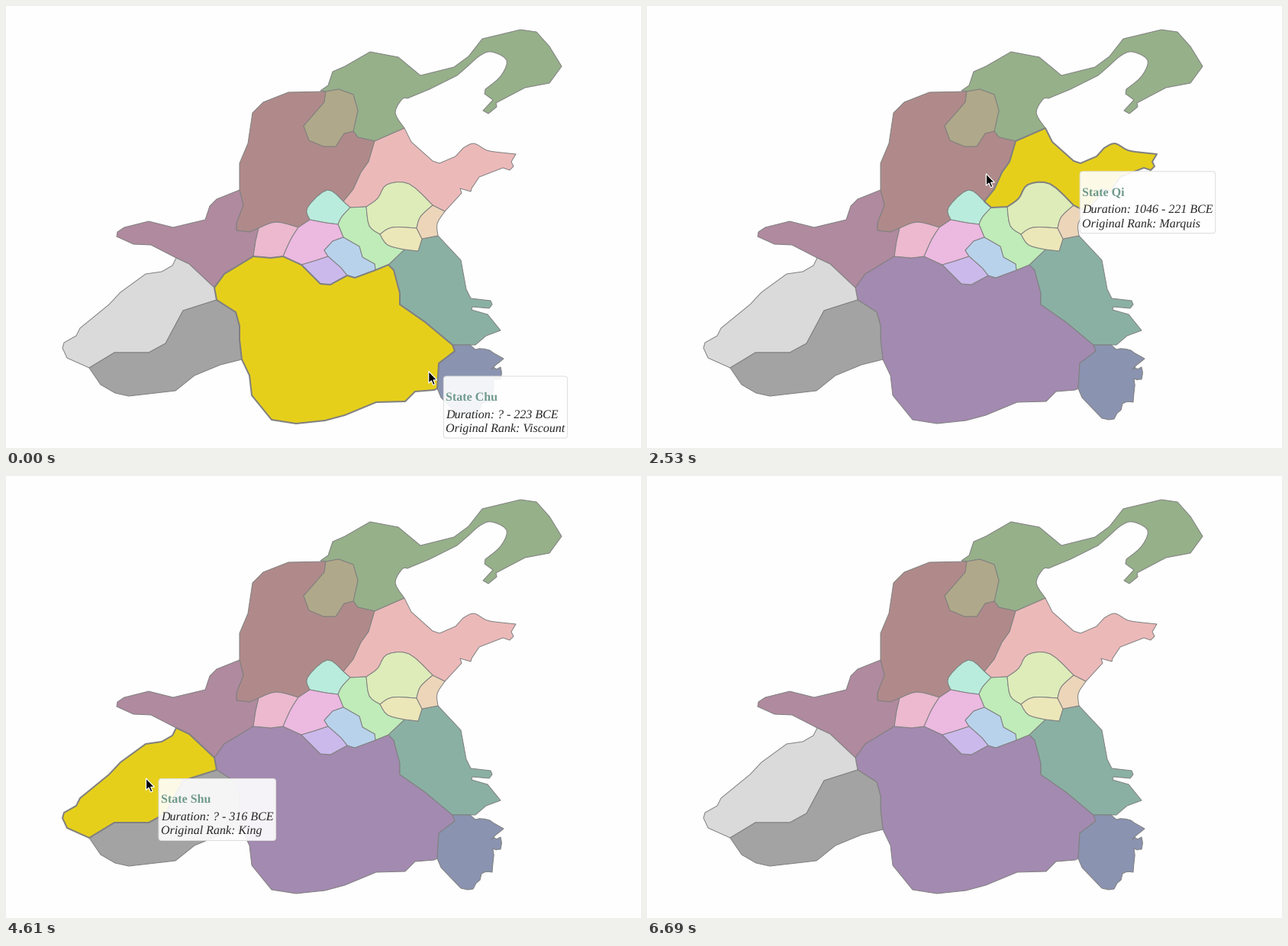
These frames come from a looping animation (832x579 px, 7140 ms). A matplotlib script:

```python
import colorsys
import random

import matplotlib.pyplot as plt
from matplotlib.animation import FuncAnimation
from matplotlib.patches import FancyBboxPatch, Polygon

W, H, DPI = 832, 579, 64
PX = 72 / DPI  # points per pixel
LOOP, STEP = 7140, 20
GOLD, LINE = "#e6cf1b", "#808080"
plt.rcParams["text.hinting"] = "none"

# ---- map: every border is given once, outlines are chained from them
borders = []


def border(names, *points):
    borders.append((names.split(), list(points)))


def smooth(*pts):
    """Catmull-Rom curve through a few points."""
    out = []
    for i in range(len(pts) - 1):
        quad = [pts[max(i - 1, 0)], pts[i], pts[i + 1], pts[min(i + 2, len(pts) - 1)]]
        for u in (0, 0.25, 0.5, 0.75):
            out.append(tuple(
                b + u * (c - a + u * (2 * a - 5 * b + 4 * c - d
                                      + u * (3 * (b - c) + d - a))) / 2
                for a, b, c, d in zip(*quad)))
    return out + [pts[-1]]


def jagged(*pts, rough=2, parts=3):
    """Ragged shore along a few points."""
    rng = random.Random(4)
    out = []
    for (ax_, ay), (bx, by) in zip(pts, pts[1:]):
        out.append((ax_, ay))
        for k in range(1, parts):
            u = k / parts
            out.append((ax_ + u * (bx - ax_) + rng.uniform(-rough, rough),
                        ay + u * (by - ay) + rng.uniform(-rough, rough)))
    return out + [pts[-1]]


def outline(name):
    arcs = [points for names, points in borders if name in names]
    path = list(arcs.pop(0))
    while arcs:
        arc = next(a for a in arcs if path[-1] in (a[0], a[-1]))
        arcs.remove(arc)
        path += arc[1:] if arc[0] == path[-1] else arc[-2::-1]
    return path


# coasts and outer frontiers
border("Yan", *smooth((522, 160), (510, 140), (519, 122), (526, 121)),
       (555, 109), (591, 91),
       *smooth((606, 78), (621, 65), (636, 60), (656, 71), (648, 92), (628, 109)),
       (627, 115), (638, 123), (625, 137), (632, 141), (643, 132), (642, 127),
       (680, 107), (712, 101), (728, 79), (712, 53), (695, 34), (674, 31), (624, 43),
       (606, 66), (587, 80), (543, 91), (514, 67), (477, 60), (444, 79), (428, 86),
       (422, 104), (412, 111), (419, 112))
border("Qi", (522, 160), (531, 178), (559, 203), (568, 206), (589, 197),
       *smooth((599, 186), (613, 180), (630, 189), (649, 192)), (668, 194),
       (662, 204), (665, 210), (660, 215), (651, 212), (620, 224), (610, 239),
       (609, 243), (595, 239), (597, 245), (586, 257), (575, 269))
border("Teng", *smooth((575, 269), (565, 285), (566, 301)))
border("Wu", (566, 301), (596, 333), (603, 371), (609, 383), (635, 386), (637, 391),
       (633, 396), (611, 394), (610, 398), (631, 404), (648, 425), (629, 432),
       (615, 444), (585, 444))
border("Yue", (585, 444), (608, 444),
       *jagged((615, 450), (634, 451), (652, 462), (636, 476), (648, 473), (648, 489),
               (638, 488), (637, 519), (623, 521), (612, 541)),
       (605, 542), (596, 540), (570, 513), (565, 501))
border("Chu", (565, 501), (561, 503), (536, 505), (523, 518), (485, 519), (444, 536),
       (418, 543), (380, 547), (348, 542), (322, 510), (319, 484), (309, 463))
border("Ba", (309, 463), (281, 470), (247, 484), (222, 504), (161, 511), (143, 507),
       (124, 496), (109, 474))
border("Shu", (109, 474), (80, 461), (74, 448), (76, 441), (92, 432), (97, 422),
       (135, 391), (150, 375), (183, 351), (204, 348), (218, 340), (223, 330))
border("Qin", (223, 330), (190, 313), (167, 312), (145, 302), (146, 296), (155, 290),
       (187, 282), (219, 290), (261, 280), (267, 262), (276, 253), (306, 241))
border("Jin", (306, 241), (306, 206), (317, 180), (323, 140), (337, 126), (370, 113),
       (419, 112))

# the large states among themselves
border("Yan Zhongshan", (419, 112), (436, 109), (455, 116), (461, 137), (455, 164))
border("Jin Zhongshan", (455, 164), (443, 167), (432, 184), (416, 184), (397, 176),
       (390, 157), (417, 126), (419, 112))
border("Jin Yan", (455, 164), (461, 172), (483, 177))
border("Yan Qi", (483, 177), (522, 160))
border("Jin Qi", (483, 177), (475, 204), (465, 218), (455, 240), (442, 256))
border("Jin Qin", (331, 291), (319, 296), (302, 294), (302, 284), (311, 261), (306, 241))
border("Qin Chu", (324, 328), (286, 351), (273, 369))
border("Qin Shu", (273, 369), (240, 338), (223, 330))
border("Shu Chu", (273, 369), (276, 385))
border("Shu Ba", (276, 385), (232, 399), (209, 442), (187, 454), (142, 454), (109, 474))
border("Ba Chu", (276, 385), (301, 401), (306, 419), (306, 437), (309, 463))
border("Chu Wu", (501, 339), (508, 346), (516, 376), (516, 391), (549, 414), (585, 444))
border("Chu Yue", (585, 444), (588, 452), (567, 468), (565, 501))

# the small states in the middle
border("Jin Zhou", *smooth((442, 256), (421, 241), (395, 264), (398, 280)))
border("Jin Zheng", (398, 280), (383, 290))
border("Jin Guo", *smooth((383, 290), (354, 283), (331, 291)))
border("Qin Guo", (331, 291), (327, 308), (324, 328))
border("Qi Zhou", (442, 256), (451, 264))
border("Qi Wey", (451, 264), (472, 263))
border("Qi Lu", *smooth((472, 263), (487, 252), (499, 234), (528, 233), (559, 261)))
border("Qi Teng", (559, 261), (575, 269))
border("Lu Wey", *smooth((472, 263), (476, 288), (490, 299)))
border("Lu Song", *smooth((490, 299), (506, 290), (538, 291)))
border("Lu Teng", *smooth((538, 291), (543, 276), (559, 261)))
border("Song Wey", *smooth((490, 299), (500, 313), (522, 319)))
border("Song Wu", (522, 319), (540, 321), (545, 305))
border("Song Teng", (538, 291), (545, 305))
border("Teng Wu", (545, 305), (566, 301))
border("Wey Wu", (522, 319), (501, 339))
border("Wey Chu", (501, 339), (484, 346))
border("Wey Zhou", *smooth((451, 264), (440, 276), (435, 286)))
border("Zhou Zheng", (435, 286), (419, 284), (398, 280))
border("Wey Zheng", (435, 286), (442, 303))
border("Wey Chen", (442, 303), (463, 315), (467, 329), (483, 338), (484, 346))
border("Guo Zheng", *smooth((383, 290), (373, 306), (363, 328)))
border("Zheng Chen", (442, 303), (428, 308), (417, 320), (422, 328))
border("Zheng Cai", (422, 328), (404, 334), (387, 339))
border("Cai Chen", (422, 328), (439, 343), (447, 353))
border("Chu Guo", (324, 328), (347, 330), (363, 328))
border("Chu Zheng", (363, 328), (387, 339))
border("Chu Cai", (387, 339), (412, 364), (425, 365), (447, 353))
border("Chu Chen", (447, 353), (457, 356), (484, 346))


def dark(hue):
    return colorsys.hls_to_rgb(hue / 360, 0.616, 0.194)


def light(hue):
    return colorsys.hls_to_rgb(hue / 360, 0.825, 0.573)


COLORS = {
    "Yan": dark(101), "Jin": dark(0), "Zhongshan": dark(48), "Qin": dark(327),
    "Chu": dark(279), "Wu": dark(161), "Yue": dark(226),
    "Shu": "#dadada", "Ba": "#a3a3a3",
    "Qi": light(0), "Zhou": light(163), "Wey": light(112), "Lu": light(76),
    "Song": light(54), "Teng": light(33), "Guo": light(334), "Zheng": light(313),
    "Chen": light(211), "Cai": light(262),
}

FACTS = {
    "Chu": ("? - 223 BCE", "Viscount"),
    "Wu": ("1090 - 473 BCE", "Earl"),
    "Qi": ("1046 - 221 BCE", "Marquis"),
    "Jin": ("1042 - 349 BCE", "Marquis"),
    "Qin": ("c. 900 - 206 BCE", "Earl"),
    "Shu": ("? - 316 BCE", "King"),
    "Ba": ("1046 - 316 BCE", "Viscount"),
    "Yue": ("? - 306 BCE", "Viscount"),
}

# ---- pointer: glides of a few visible steps, then a rest
HOP = 146  # ms per step
LAG = 0.035  # share of the way the tooltip has gone on the first step
START = (557, 485)
GLIDES = [  # start ms, steps, goal, sag of the way
    (0, 2, (553, 477), 0),
    (750, 3, (564.5, 358), 0),
    (1490, 4, (557, 216), 0),
    (2530, 3, (376, 222), 0),
    (3270, 4, (222.5, 300), 0),
    (4460, 2, (183.5, 396), 0),
    (5050, 2, (235, 456), 0),
    (5950, 6, (755, 523), 25),
]
EXIT = GLIDES[-1][0] + HOP * (GLIDES[-1][1] - 1)


def ease(u):
    return 1 - (1 - u) ** 2.4


def track(now):
    """Pointer and the trailing point that the page has registered."""
    n = max(i for i, g in enumerate(GLIDES) if g[0] <= now)
    begin, steps, (gx, gy), sag = GLIDES[n]
    sx, sy = GLIDES[n - 1][2] if n else START
    k = min(1 + int((now - begin) // HOP), steps)

    def along(s):
        return sx + s * (gx - sx), sy + s * (gy - sy) + sag * 6.75 * s * (1 - s) ** 2

    return along(ease(k / steps)), along(LAG + (1 - LAG) * ease((k - 1) / (steps - 1)))


# ---- scene
fig = plt.figure(figsize=(W / DPI, H / DPI), dpi=DPI, facecolor="#fefefe")
ax = fig.add_axes([0, 0, 1, 1])
ax.set_xlim(0, W)
ax.set_ylim(H, 0)
ax.axis("off")

shapes = {name: ax.add_patch(Polygon(outline(name), ec=LINE, joinstyle="round"))
          for name in COLORS}

TIP_H = 81
box = ax.add_patch(FancyBboxPatch((0, 0), 1, TIP_H,
                                  boxstyle="round,pad=0,rounding_size=4",
                                  fc=(1, 1, 1, 0.9), ec="#dddddd", lw=PX, zorder=5))


def label(color, **style):
    return ax.text(0, 0, "", color=color, family="Liberation Serif", size=16 * PX,
                   va="baseline", zorder=6, **style)


title = label("#709a8c", weight="bold")
duration = label("#262626", style="italic")
rank = label("#262626", style="italic")
lines = [(title, 31.5), (duration, 54.5), (rank, 72.5)]

ARROW = [(0, 0), (0, 15.5), (3.6, 12.3), (6, 18), (8.6, 17), (6.2, 11.4), (11, 11.4)]
pointer = ax.add_patch(Polygon(ARROW, fc="black", ec="white", lw=1.2 * PX, zorder=7))


def write(name):
    span, grade = FACTS[name]
    title.set_text(f"State {name}")
    duration.set_text(f"Duration: {span}")
    rank.set_text(f"Original Rank: {grade}")


def tip_width(name):
    write(name)
    renderer = fig.canvas.get_renderer()
    return 6 + max(t.get_window_extent(renderer).width for t, _ in lines)


widths = {name: tip_width(name) for name in FACTS}


def draw(i):
    now = i * STEP + STEP / 2
    (px, py), spot = track(now)
    hovered = None
    if now < EXIT:
        hovered = next((n for n in FACTS if shapes[n].get_path().contains_point(spot)),
                       None)

    for name, shape in shapes.items():
        hot = name == hovered
        shape.set_facecolor(GOLD if hot else COLORS[name])
        shape.set_linewidth((2 if hot else 1) * PX)
        shape.set_zorder(2 if hot else 1)

    pointer.set_visible(now < EXIT)
    pointer.set_xy([(px + x, py + y) for x, y in ARROW])

    for part in (box, title, duration, rank):
        part.set_visible(hovered is not None)
    if hovered:
        write(hovered)
        x = spot[0] + 16.5
        y = min(spot[1] + 0.5, H - TIP_H - 13)  # stay on the stage
        box.set_bounds(x, y, widths[hovered], TIP_H)
        for text, drop in lines:
            text.set_position((x + 3, y + drop))
    return []


anim = FuncAnimation(fig, draw, frames=LOOP // STEP, interval=STEP, repeat=True,
                     repeat_delay=0, blit=False)
plt.show()
```
